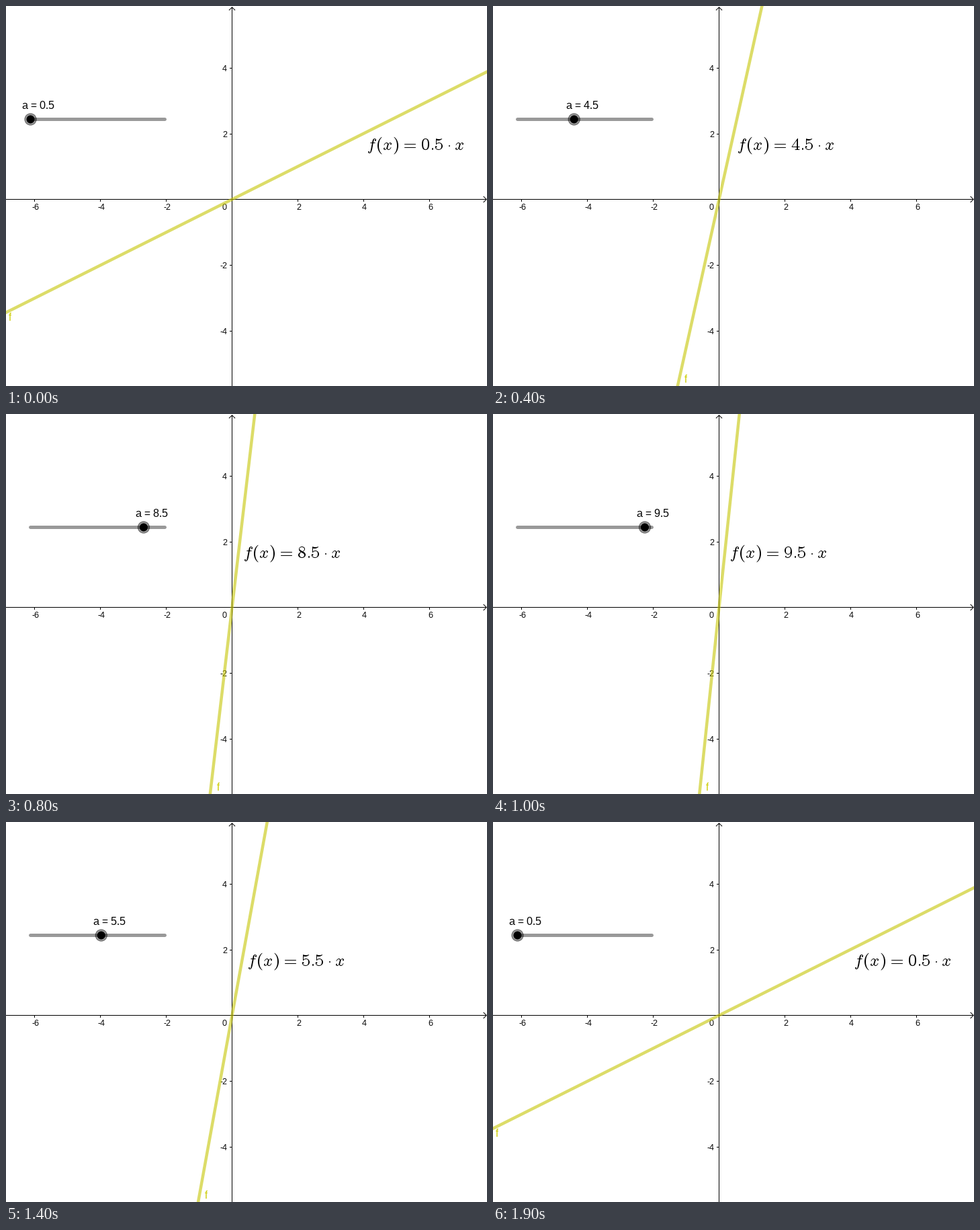
Recreate the animation shown at these times as a matplotlib script. Size 716 by 565 pixels, loop 1.95 s.

```python
import matplotlib.pyplot as plt
from matplotlib.animation import FuncAnimation
from matplotlib.patches import Circle

W, H, DPI = 716, 565, 64
PT = 72 / DPI                 # points per pixel
OX, OY, UNIT = 336.5, 287.5, 48.92
FRAMES, STEP = 39, 50
LOW, HIGH = 0.5, 10
BAR_X, BAR_W, BAR_Y = 36.5, 200, 168.5
OLIVE = (0.775, 0.775, 0.01)

plt.rcParams["font.family"] = "Liberation Sans"
plt.rcParams["mathtext.fontset"] = "cm"
plt.rcParams["text.hinting"] = "default"
plt.rcParams["text.hinting_factor"] = 1

fig = plt.figure(figsize=(W / DPI, H / DPI), dpi=DPI, facecolor="white")
ax = fig.add_axes([0, 0, 1, 1])
ax.set_xlim(0, W)
ax.set_ylim(H, 0)
ax.axis("off")


def stroke(xs, ys, width=1, color="black", **kw):
    return ax.plot(xs, ys, color=color, lw=width * PT, snap=False, **kw)[0]


def label(x, y, text, size, **kw):
    kw = {"ha": "left", "va": "baseline", "zorder": 2, **kw}
    return ax.text(x, y, text, fontsize=size * PT, **kw)


def disc(radius, **kw):
    return ax.add_patch(Circle((0, BAR_Y), radius, snap=False, **kw))


def draw_axes():
    flat = {"solid_capstyle": "butt"}
    stroke([0, W - 1], [OY, OY], **flat)
    stroke([OX, OX], [2, H], **flat)
    stroke([W - 5, W - 0.8, W - 5], [OY - 4.2, OY, OY + 4.2])
    stroke([OX - 4.2, OX, OX + 4.2], [6, 1.8, 6])
    for n in (-6, -4, -2, 2, 4, 6):
        x = int(OX + n * UNIT) + 0.5
        stroke([x, x], [OY, OY + 3.5], **flat)
        label(x + 1, 303, str(n), 12, ha="center")
    for n in (-4, -2, 2, 4):
        y = round(OY - n * UNIT) + 0.5
        stroke([OX - 3.5, OX], [y, y], **flat)
        label(329, y + 4.5, str(n), 12, ha="right")
    label(329, 303, "0", 12, ha="right")


draw_axes()
graph = stroke([], [], 4.5, OLIVE, alpha=0.6, zorder=3)
graph_name = label(0, 0, "f", 16, color=(0.8, 0.8, 0), zorder=4)
formula = label(0, 214, "", 25.6, zorder=4)

stroke([BAR_X, BAR_X + BAR_W], [BAR_Y, BAR_Y], 5, alpha=0.4,
       solid_capstyle="round", zorder=4)
knob = [
    disc(9, fc="black", ec="none", alpha=0.4, zorder=5),
    disc(8.5, fc="none", ec="black", lw=PT, alpha=0.35, zorder=6),
    disc(6, fc="black", ec="none", zorder=7),
]
value = label(0, 153, "", 16, zorder=8)


def update(i):
    a = HIGH - 0.5 * abs(i - FRAMES // 2)

    reach = 400
    graph.set_data([OX - reach, OX + reach], [OY + a * reach, OY - a * reach])
    foot = OX - (H - OY) / a
    graph_name.set_position((foot + 10 if foot > 0 else 4,
                             min(OY + a * OX + 12, 560)))

    formula.set_x(OX + 2 * UNIT / a + 4)
    formula.set_text(r"$f\hspace{0.1}(x)\hspace{0.078}=\hspace{0.078}"
                     rf"{a:g}\hspace{{0.022}}\cdot\hspace{{0.022}}x$")

    x = BAR_X + BAR_W * (a - LOW) / (HIGH - LOW)
    for part in knob:
        part.center = (x, BAR_Y)
    value.set_x(round(x - 12))
    value.set_text(f"a = {a:g}")
    return graph, graph_name, formula, value, *knob


anim = FuncAnimation(fig, update, frames=FRAMES, interval=STEP,
                     repeat=True, repeat_delay=0, blit=False)
plt.show()
```
